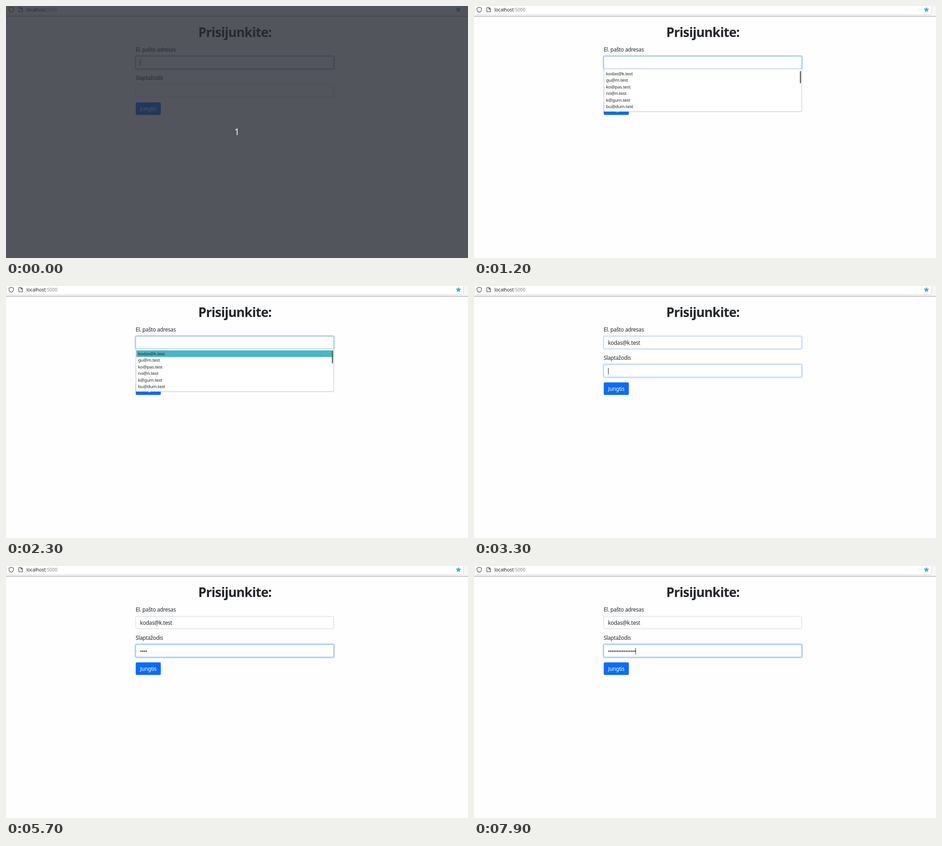
These frames come from a looping animation (1013 px wide and 553 px high, 8 s). An HTML page:

```html
<!DOCTYPE html>
<html lang="lt">
<head>
<meta charset="utf-8">
<title>Prisijunkite</title>
<style>
  html, body { margin: 0; width: 100%; height: 100%; overflow: hidden; background: #fefefe; }
  svg { display: block; width: 1013px; height: 553px; }
  text { font-family: "Noto Sans", "Open Sans", sans-serif; fill: #212529; }
  .body { font-size: 11.8px; letter-spacing: -.29px; }
  .small { font-size: 10.2px; letter-spacing: -.08px; }
  .item { font-size: 9.8px; letter-spacing: -.25px; }
  .title { font-size: 28.5px; font-weight: 600; letter-spacing: -.9px; text-anchor: middle; }
  .icon { fill: none; stroke: #3c3c44; stroke-width: 1.1; stroke-linejoin: round; }
</style>
</head>
<body>
<svg viewBox="0 0 1013 553">
  <rect width="1013" height="553" fill="#fefefe"/>

  <!-- address bar -->
  <rect width="1013" height="22.5" fill="#f8f8f9"/>
  <path d="M0-5H1003.5V16.5Q1003.5 19.5 1000.5 19.5H3Q.5 19.5 .5 16.5V-5" fill="#fff" stroke="#d6d6d9"/>
  <rect y="22" width="1013" height="1.3" fill="#aaaaac"/>
  <path class="icon" d="M11.5 2.8L16.4 4.5V7.4C16.4 10.5 14.4 12.6 11.5 13.7C8.600 12.600 6.600 10.500 6.600 7.400V4.500Z"/>
  <path class="icon" d="M28.200 3.200H32.800L36 6.400V12.800H28.200ZM32.600 3.400V6.600H35.800"/>
  <text class="small" x="44.700" y="11.800">localhost<tspan fill="#8c8c90">:5000</tspan></text>
  <path id="star" fill="#42b8c8"/>

  <!-- form -->
  <text class="title" x="501.800" y="67.500">Prisijunkite:</text>
  <text class="body" x="284.300" y="100.300">El. pašto adresas</text>
  <text class="body" x="284.300" y="162.300">Slaptažodis</text>
  <g id="fields"></g>
  <text class="body" id="email" x="293.800" y="128.500">kodas@k.test</text>
  <g id="dots" fill="#212529"></g>
  <rect x="284.500" y="211.500" width="55" height="27.500" rx="2.800" fill="#0a6cff"/>
  <text class="body" x="294" y="230" style="fill:#fff">Jungtis</text>
  <rect id="caret" width="1" height="14" fill="#212529"/>

  <!-- suggestions -->
  <g id="popup">
    <rect x="284" y="138" width="435.500" height="94.800" rx="2" fill="#000" opacity=".12"/>
    <rect x="285" y="138" width="433.500" height="93.500" rx="1" fill="#fff" stroke="#cfcfd2" stroke-width=".8"/>
    <rect id="mark" x="286" width="431.500" height="14.600" fill="#47b7c5"/>
    <rect x="714.600" y="143" width="2.400" height="26.500" fill="#55565a"/>
    <g id="items"></g>
  </g>

  <!-- countdown -->
  <g id="count">
    <rect width="1013" height="553" fill="#272b33" opacity=".8"/>
    <text x="506.300" y="283" text-anchor="middle" style="fill:#fff;font-size:20px">1</text>
  </g>
</svg>
<script>
const LOOP = 8000, STEP = 3.78, FIELD_X = 294;
const NS = "http://www.w3.org/2000/svg";
const $ = id => document.getElementById(id);

function add(parent, tag, attrs, text = "") {
  const el = document.createElementNS(NS, tag);
  for (const k in attrs) el.setAttribute(k, attrs[k]);
  el.textContent = text;
  return parent.appendChild(el);
}

// Input box plus its focus ring, returned for fading
function field(y) {
  const box = { x: 284.5, y, width: 434, height: 27.3, rx: 2.8 };
  add($("fields"), "rect", { ...box, fill: "#fff", stroke: "#ced4da" });
  const ring = add($("fields"), "g", {});
  add(ring, "rect", { x: 282, y: y - 2.7, width: 439.2, height: 32.7, rx: 5, fill: "#c2dafe" });
  add(ring, "rect", { ...box, fill: "#fff", stroke: "#86b7fe" });
  return ring;
}

const rings = [field(110.4), field(172.5)];
const names = ["kodas@k.test", "gu@m.test", "ko@pas.test", "no@n.test", "k@gum.test", "bu@dum.test"];
names.forEach((name, i) =>
  add($("items"), "text", { class: "item", x: 289.6, y: 151.7 + i * 14.5 }, name));
const dots = Array.from({ length: 16 }, (_, i) =>
  add($("dots"), "circle", { cx: FIELD_X + (i + .5) * STEP, cy: 186.9, r: 1.35 }));

const star = Array.from({ length: 10 }, (_, i) => {
  const a = i * Math.PI / 5, r = i % 2 ? 3.1 : 6.3;
  return (992 + r * Math.sin(a)).toFixed(2) + " " + (8.3 - r * Math.cos(a)).toFixed(2);
});
$("star").setAttribute("d", "M" + star.join("L") + "Z");

// Step tables: [start ms, value]
const popup = [[0, 0], [600, .5], [700, 1], [2400, .5], [2500, 0]];
const mark = [[0, -1], [1800, 1], [2000, 0]];
const focus = [[0, 0], [3300, .6], [3400, 1]];
const caret = [[0, 1], [1200, 0], [3300, 1], [5700, 0], [5900, 1]];
const typed = [[0, 0], [3900, 1], [4100, 2], [4300, 3], [4700, 4], [5900, 5], [6300, 6],
  [6600, 7], [6900, 8], [7000, 9], [7200, 10], [7300, 11], [7600, 12], [7700, 13],
  [7800, 15], [7900, 16]];

function at(table, t) {
  let value = table[0][1];
  for (const [start, v] of table) if (t >= start) value = v;
  return value;
}
const show = (el, on) => el.setAttribute("opacity", Number(on));

function draw(t) {
  const f = at(focus, t), n = at(typed, t), m = at(mark, t);
  show($("count"), t < 100);
  show($("popup"), at(popup, t));
  show($("mark"), m >= 0);
  $("mark").setAttribute("y", 141.2 + Math.max(m, 0) * 14.5);
  show($("email"), t >= 2400);
  show(rings[0], 1 - f);
  show(rings[1], f);
  dots.forEach((dot, i) => show(dot, i < n));
  show($("caret"), at(caret, t));
  $("caret").setAttribute("x", Math.floor(FIELD_X + n * STEP));
  $("caret").setAttribute("y", t < 3300 ? 117 : 180);
}

const begin = performance.now();
function tick() {
  draw((performance.now() - begin) % LOOP);
  requestAnimationFrame(tick);
}
tick();
</script>
</body>
</html>
```
